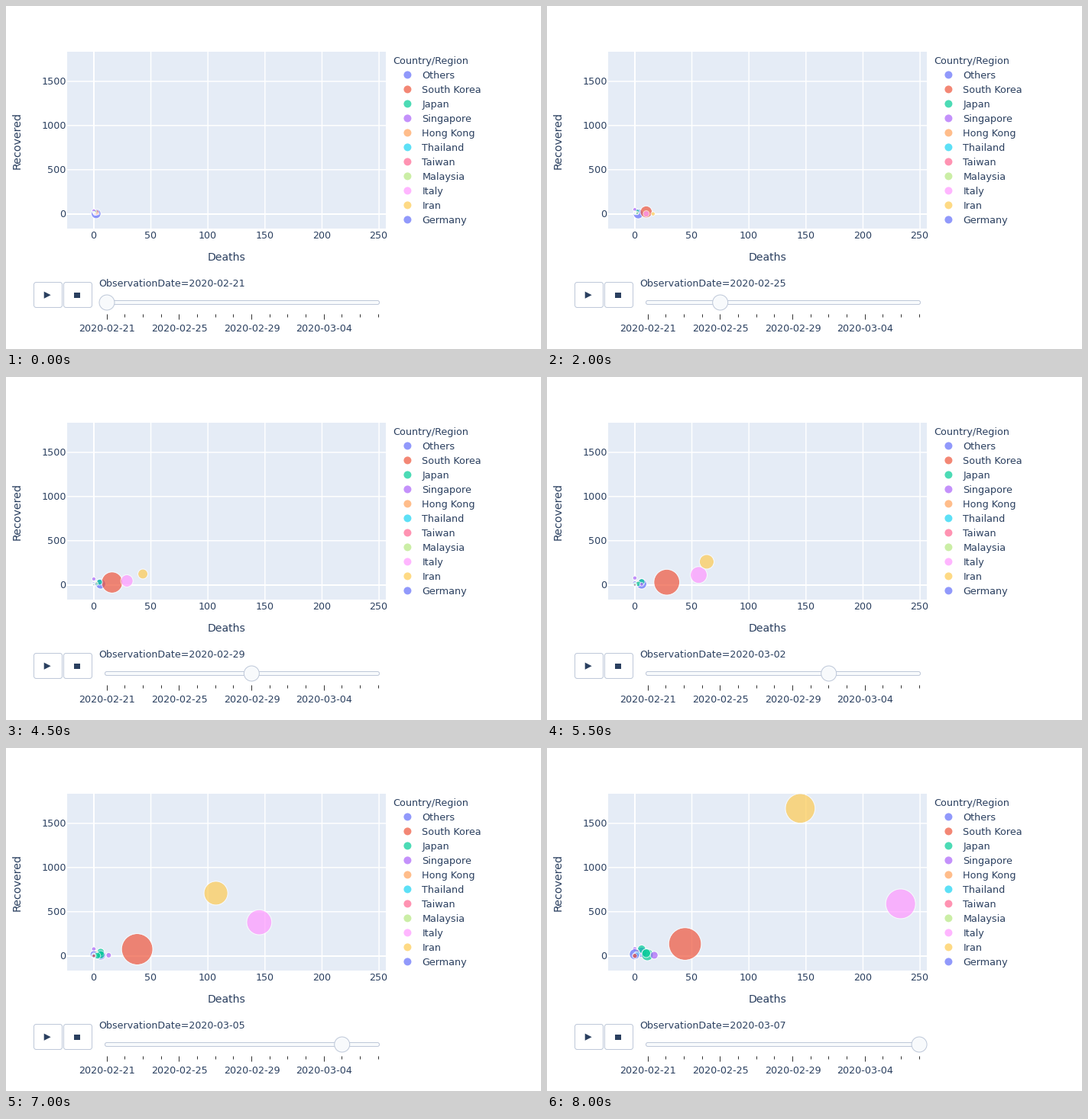
Recreate the animation shown at these times as a matplotlib script. Size 700 by 450 pixels, loop 8500 ms.

```python
import matplotlib.pyplot as plt
import numpy as np
from matplotlib.animation import FuncAnimation
from matplotlib.patches import Circle, FancyBboxPatch, Polygon, Rectangle

W, H, DPI = 700, 450, 100
PX = 72 / DPI
LAST_DAY = 15
INK, BORDER, PALE = "#2a3f5f", "#bec8d9", "#f8fafc"
PALETTE = ["#636efa", "#ef553b", "#00cc96", "#ab63fa", "#ffa15a",
           "#19d3f3", "#ff6692", "#b6e880", "#ff97ff", "#fecb52"]
DATES = np.datetime64("2020-02-21") + np.arange(LAST_DAY + 1)

plt.rcParams["font.family"] = "DejaVu Sans"
fig = plt.figure(figsize=(W / DPI, H / DPI), dpi=DPI, facecolor="white")
ax = fig.add_axes([0, 0, 1, 1])
ax.set(xlim=(0, W), ylim=(H, 0))
ax.axis("off")


def text(x, y, s, ha="left", size=12.6, **kw):
    kw.setdefault("va", "baseline")
    return ax.text(x, y, s, ha=ha, fontsize=size * PX, color=INK, **kw)


def line(xs, ys, color, width, snap=True):
    ax.plot(xs, ys, color=color, lw=width * PX, snap=snap,
            solid_capstyle="butt", zorder=0.5)


def rounded(x, y, w, h, radius, fill):
    ax.add_patch(FancyBboxPatch((x, y), w, h, fc=fill, ec=BORDER, lw=PX,
                                boxstyle=f"round,pad=0,rounding_size={radius}"))


def x_pos(deaths):
    return 114.9 + 1.4927 * deaths


def y_pos(recovered):
    return 272.7 - 0.1159 * recovered


def slider_x(day):
    return 131.6 + 23.67 * day


class Bubble:
    """Cases grow from first to last at a slowing rate; the centre follows
    {day: (deaths, recovered)} waypoints with exponential growth between."""

    def __init__(self, color, first, last, slowing, waypoints):
        self.first, self.last, self.slowing = first, last, slowing
        self.days = list(waypoints)
        self.levels = np.log1p(list(waypoints.values())).T
        self.fill = Circle((0, 0), 1, fc=PALETTE[color], ec="none", alpha=0.7)
        self.ring = Circle((0, 0), 1, fc="none", ec="white", lw=PX, alpha=0.7)
        for patch in (self.fill, self.ring):
            ax.add_patch(patch)
            patch.set_clip_path(panel)

    def show(self, day):
        progress = 1 - (1 - day / LAST_DAY) ** self.slowing
        cases = self.first * (self.last / self.first) ** progress
        r = 0.255 * np.sqrt(cases)
        deaths, recovered = (round(np.expm1(np.interp(day, self.days, level)))
                             for level in self.levels)
        self.fill.set_radius(max(r - 0.5, 0))
        self.ring.set_radius(r)
        for patch in (self.fill, self.ring):
            patch.center = x_pos(deaths), y_pos(recovered)


# Plot panel, grid and axes
panel = ax.add_patch(Rectangle((80, 60), 417, 232, fc="#e5ecf6", ec="none", zorder=0))
for value in range(0, 251, 50):
    x = x_pos(value)
    line([x, x], [60, 292], "white", 1.5 if value else 2, snap=value == 0)
    text(x - 0.5, 305, str(value), "center")
for value in range(0, 1501, 500):
    y = y_pos(value)
    line([80, 497], [y, y], "white", 1.5 if value else 2, snap=value == 0)
    text(78.6, y + 4.6, str(value), "right", 12.7)
text(289, 334, "Deaths", "center", 14)
text(15, 176.2, "Recovered", "center", 14.3, rotation=90, va="center")

# Legend
text(506.4, 76, "Country/Region", size=12.7)
names = ["Others", "South Korea", "Japan", "Singapore", "Hong Kong", "Thailand",
         "Taiwan", "Malaysia", "Italy", "Iran", "Germany"]
for i, name in enumerate(names):
    y = 90.4 + 19 * i
    ax.add_patch(Circle((525.4, y), 5, fc=PALETTE[i % 10], ec="none", alpha=0.7))
    text(544.5, y + 4.6, name, size=12.75)

# Bubbles, lowest first: colour, first and last cases, slowing, waypoints
bubbles = [
    Bubble(0, 634, 700, 2, {0: (2, 1), 4: (3, 0), 7: (6, 10), 13: (6, 10), 15: (6, 40)}),
    Bubble(1, 204, 7041, 1.85, {0: (2, 16), 4: (10, 22), 8: (16, 27), 10: (28, 30),
                                12: (35, 41), 14: (42, 135), 15: (44, 135)}),
    Bubble(2, 105, 461, 1, {0: (1, 22), 9: (6, 32), 14: (6, 46), 15: (6, 76)}),
    Bubble(3, 85, 138, 1, {0: (0, 37), 10: (0, 78)}),
    Bubble(4, 68, 108, 1, {0: (2, 5), 15: (2, 51)}),
    Bubble(5, 35, 50, 1, {0: (0, 17), 15: (1, 31)}),
    Bubble(6, 26, 45, 1, {0: (1, 2), 15: (1, 12)}),
    Bubble(7, 22, 93, 0.7, {0: (0, 15), 15: (0, 22)}),
    Bubble(8, 50, 5883, 1.3, {0: (1, 0), 4: (10, 1), 8: (29, 45), 12: (107, 276),
                              14: (197, 523), 15: (233, 589)}),
    Bubble(9, 18, 5823, 1.28, {0: (4, 0), 4: (16, 0), 8: (43, 123), 12: (92, 552),
                               14: (124, 913), 15: (145, 1669)}),
    Bubble(0, 16, 799, 0.8, {0: (0, 14), 15: (0, 18)}),
    Bubble(1, 16, 18, 1, {0: (0, 14), 4: (0, 16)}),
    Bubble(2, 12, 949, 0.85, {0: (1, 4), 10: (3, 12), 13: (6, 12), 15: (11, 12)}),
    Bubble(3, 15, 402, 0.75, {7: (0, 7), 10: (6, 7), 12: (11, 7), 15: (17, 7)}),
    Bubble(5, 9, 206, 0.8, {12: (0, 8), 15: (2, 18)}),
    Bubble(2, 2, 500, 1.15, {10: (0, 2), 14: (5, 2), 15: (10, 30)}),
    Bubble(0, 1, 268, 1, {11: (0, 0), 15: (1, 3)}),
    Bubble(1, 1, 161, 1, {0: (0, 0)}),
]

# Playback buttons
for x in (36.5, 75.5):
    rounded(x, 362.5, 37, 33, 3, "white")
ax.add_patch(Polygon([(49.7, 374.6), (49.7, 383.8), (58.6, 379.2)], fc=INK, ec="none"))
ax.add_patch(Rectangle((89, 376), 8, 7, fc=INK, ec="none"))

# Date slider
rounded(129.5, 386.5, 359, 5, 2.4, PALE)
thumb = ax.add_patch(Circle((0, 0), 10, fc=PALE, ec=BORDER, lw=PX, zorder=2))
caption = text(121.3, 368, "")
for day, date in enumerate(DATES):
    x = slider_x(day)
    major = day % 4 == 0
    line([x, x], [404, 411 if major else 408], "#333333", 1)
    if major:
        text(x + 0.5, 427, str(date), "center", 12.7)


def draw(step):
    # Day 7 is held for two beats.
    day = step - (step > 7)
    for bubble in bubbles:
        bubble.show(day)
    thumb.center = slider_x(day) + 0.4, 389
    caption.set_text(f"ObservationDate={DATES[day]}")


anim = FuncAnimation(fig, draw, frames=LAST_DAY + 2, interval=500,
                     repeat=True, repeat_delay=0)
plt.show()
```
